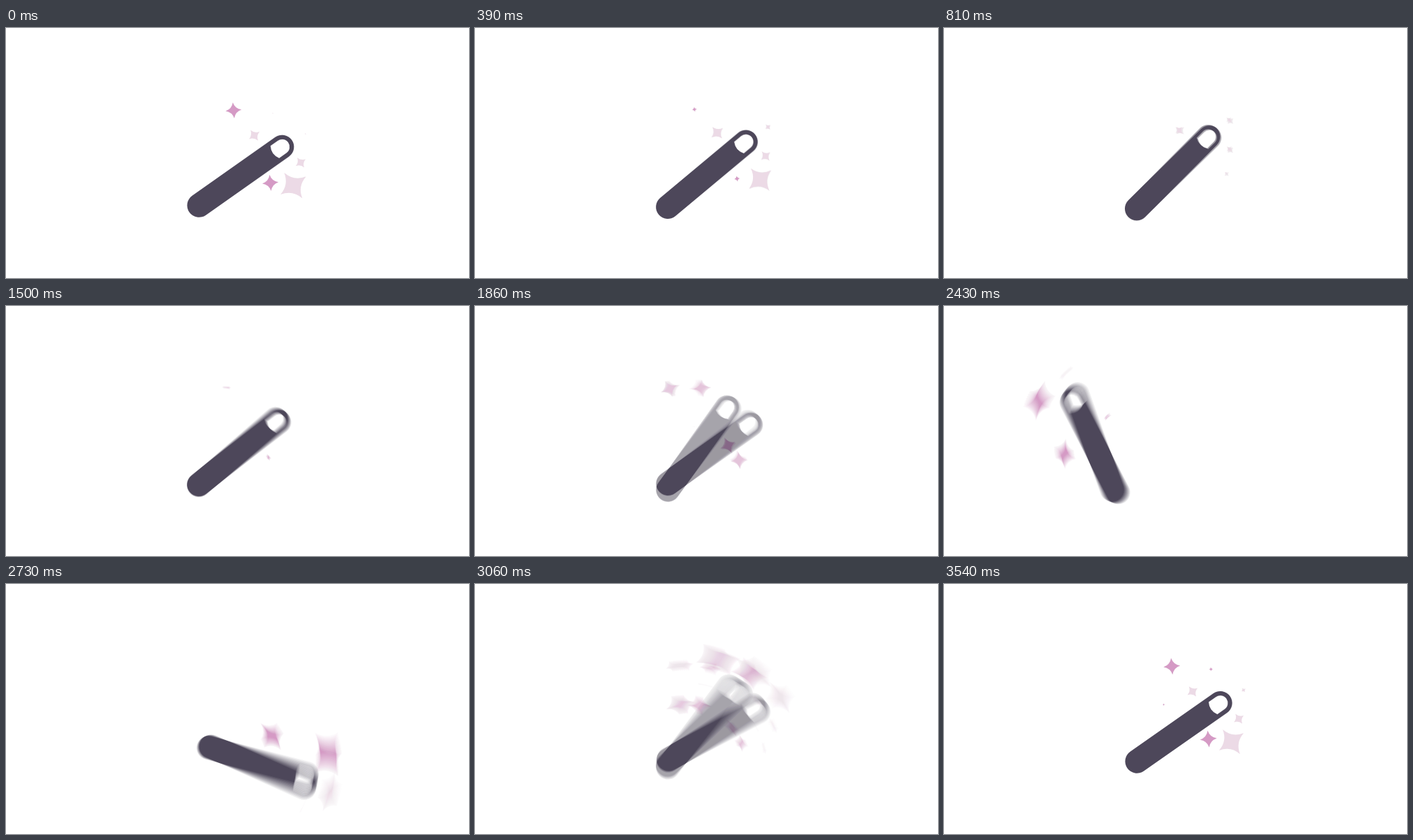
An HTML page with a canvas for the animation above (3570 ms loop, 663x359 px).

```html
<!DOCTYPE html>
<html lang="en">
<head>
<meta charset="utf-8">
<title>Magic wand</title>
<style>
  html, body { margin: 0; width: 100%; height: 100%; overflow: hidden; background: #fff; }
  canvas { display: block; }
</style>
</head>
<body>
<canvas id="stage" width="663" height="359"></canvas>
<script>
const W = 663, H = 359, LOOP = 3570, STEP = 30;
const EXPOSURE = 37.5, SHUTTER = 18, SAMPLES = 16;
const DARK = '#4d475a', PINK = '#d59ac5', PALE = '#ecdae6';

const LENGTH = 145.7, RADIUS = 17;
const PIVOT = { x: 304, y: 259.5 }, HANDLE_OFFSET = 28;
const REST = 35.2, MIDDLE = 45, SPREAD = MIDDLE - REST;

// Start times of the phases that follow the first settling
const SHAKE = 1110, SWING = 1895, RETURN = 3275;
const SWING_SIZE = 80, SWING_RATE = 0.01365;

const stage = document.getElementById('stage').getContext('2d');
const layer = document.createElement('canvas');
layer.width = W;
layer.height = H;
const ctx = layer.getContext('2d');

// Placed along (x) and across (y) the wand from its tip; each swells and fades around a peak time
const sparkle = (x, y, color, size, peak, span) => ({ x, y, color, size, peak, span });
const sparkles = [
  sparkle(-23, -36.4, PALE, 10.5, 300, 900),
  sparkle(38, 4, PALE, 19, 2980, 610),
  sparkle(38, 4, PALE, 7, 600, 400),
  sparkle(8.7, 33.8, PALE, 8.7, 150, 1050),
  sparkle(-19, 54.6, PALE, 23.5, 150, 700),
  sparkle(-26.5, -83, PINK, 12.4, 3400, 650),
  sparkle(-26.5, -83, PINK, 12.4, 1900, 450),
  sparkle(-43.6, 32.5, PINK, 12.4, 3420, 650),
  sparkle(-43.6, 32.5, PINK, 12.4, 1970, 550),
  sparkle(17, -47.4, PINK, 23.5, 2760, 820),
  sparkle(-67.6, -44.7, PINK, 17, 2720, 850)
];

function sizeAt({ size, peak, span }, t) {
  const gap = Math.abs(t - peak);
  const distance = Math.min(gap, LOOP - gap);
  return distance < span ? size * Math.cos(Math.PI / 2 * distance / span) : 0;
}

function angleAt(t) {
  if (t < SHAKE) {
    const decay = Math.pow(1 - t / SHAKE, 1.5);
    return MIDDLE - SPREAD * decay * Math.cos(2 * Math.PI * t / 360);
  }
  if (t < SWING) {
    // The shaking gets faster and faster
    const phase = 3.77 * Math.pow((t - SHAKE) / 390, 2.7125);
    return MIDDLE + SPREAD * Math.sin(phase);
  }
  if (t < RETURN) {
    const envelope = Math.sin(Math.PI * (t - SWING) / (RETURN - SWING));
    return MIDDLE + SWING_SIZE * envelope * Math.sin(SWING_RATE * (t - 2353));
  }
  const decay = Math.pow(1 - (t - RETURN) / (LOOP - RETURN), 2);
  return REST + decay * (SPREAD + 58 * Math.sin(SWING_RATE * (t - RETURN)));
}

// Brief leap to the upper left during the big swing
function leapAt(t) {
  const distance = Math.min(1, Math.abs(t - 2360) / 240);
  return Math.cos(Math.PI / 2 * distance) ** 2;
}

function drawWand() {
  ctx.fillStyle = DARK;
  ctx.beginPath();
  ctx.arc(0, 0, RADIUS, -Math.PI / 2, Math.PI / 2);
  ctx.arc(-LENGTH, 0, RADIUS, Math.PI / 2, Math.PI * 1.5);
  ctx.fill();

  ctx.fillStyle = '#fff';
  ctx.beginPath();
  ctx.arc(0, 0, 10.8, -Math.PI / 2, Math.PI / 2);
  ctx.lineTo(-12.8, 10.8);
  ctx.quadraticCurveTo(-19.5, 0, -12.8, -10.8);
  ctx.fill();
}

function drawSparkle(s, t) {
  const r = sizeAt(s, t);
  if (r < 0.1) return;
  ctx.save();
  ctx.translate(s.x, s.y);
  if (s.color === PINK) ctx.rotate(Math.PI / 6);
  ctx.fillStyle = s.color;
  ctx.beginPath();
  ctx.moveTo(r, 0);
  for (let i = 0; i < 4; i++) {
    ctx.quadraticCurveTo(r * 0.2, r * 0.2, 0, r);
    ctx.rotate(Math.PI / 2);
  }
  ctx.fill();
  ctx.restore();
}

function drawScene(t) {
  const angle = angleAt(t), leap = leapAt(t);
  ctx.fillStyle = '#fff';
  ctx.fillRect(0, 0, W, H);
  ctx.save();
  ctx.translate(PIVOT.x - 64 * leap, PIVOT.y - 26 * leap);
  ctx.rotate((MIDDLE - angle) * Math.PI / 180);
  ctx.translate(-HANDLE_OFFSET, 0);
  ctx.rotate(-MIDDLE * Math.PI / 180);
  ctx.translate(LENGTH, 0);
  drawWand();
  sparkles.forEach(s => drawSparkle(s, t));
  ctx.restore();
}

// Four exposures spread over five steps; the middle step mixes two of them
function exposuresFor(step) {
  const first = 4 * Math.floor(step / 5);
  return [[0], [1], [1, 2], [2], [3]][step % 5].map(n => (first + n) * EXPOSURE);
}

// Running average of all moments within the open shutter
function render(step) {
  let count = 0;
  for (const time of exposuresFor(step)) {
    for (let i = 0; i < SAMPLES; i++) {
      const offset = ((i + 0.5) / SAMPLES - 0.5) * SHUTTER;
      drawScene(Math.min(LOOP, Math.max(0, time + offset)));
      stage.globalAlpha = 1 / ++count;
      stage.drawImage(layer, 0, 0);
    }
  }
}

let shown = -1;
const start = performance.now();

function tick() {
  const step = Math.floor(((performance.now() - start) % LOOP) / STEP);
  if (step !== shown) render(shown = step);
  requestAnimationFrame(tick);
}
tick();
</script>
</body>
</html>
```
